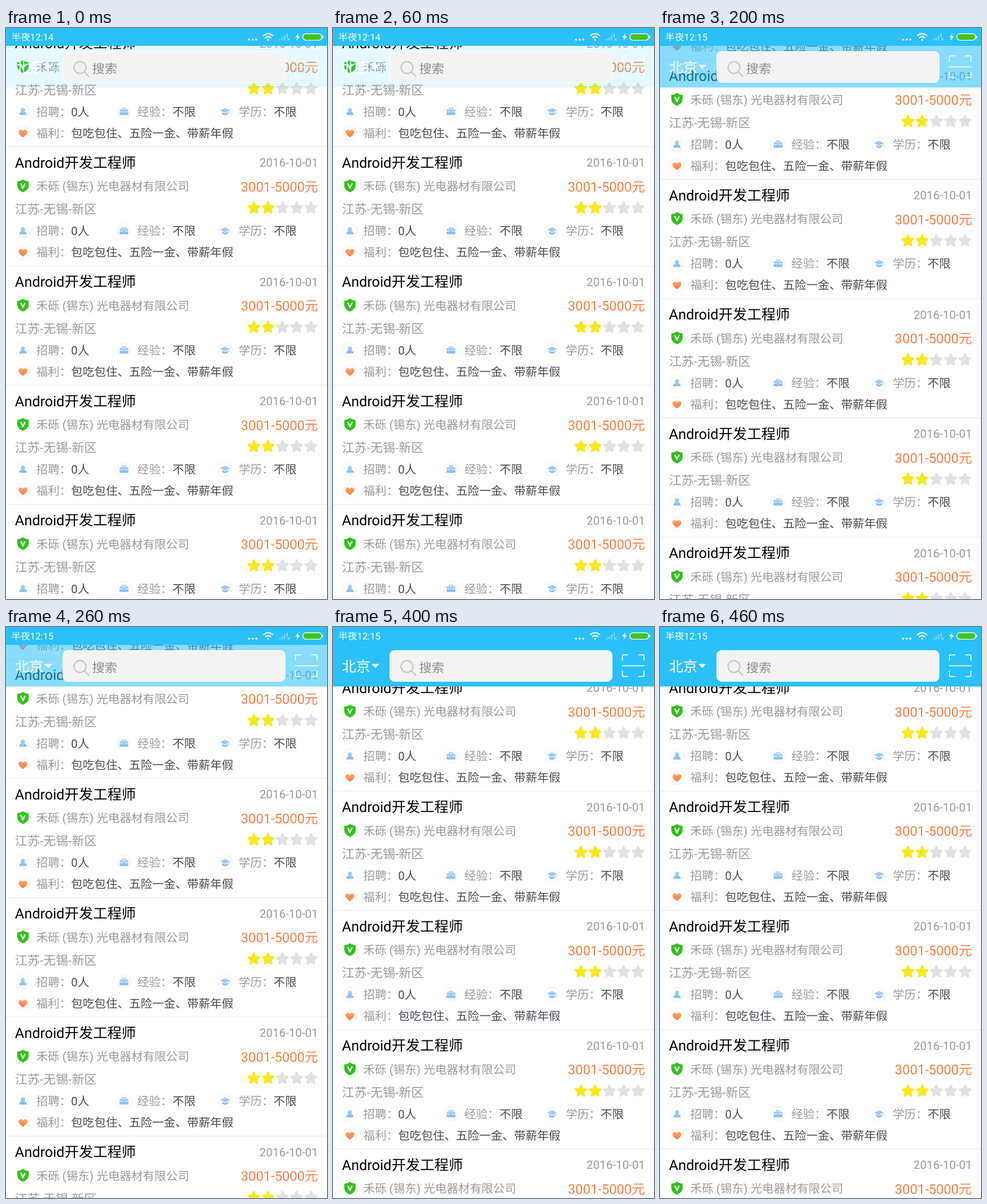
An HTML page that plays this animation: 540 px wide and 960 px high, repeating every 500 ms.

```html
<!DOCTYPE html>
<html lang="zh-CN">
<head>
<meta charset="utf-8">
<title>职位列表</title>
<style>
  @property --scroll { syntax: "<number>"; inherits: true; initial-value: 0; }

  html, body { margin: 0; width: 100%; height: 100%; overflow: hidden; background: #fff; }
  svg.stage {
    display: block; width: 540px; height: 960px;
    font: 19.5px Roboto, "Noto Sans CJK SC", "Noto Sans CJK", sans-serif;
    text-rendering: geometricPrecision;
    animation: scroll .5s step-end infinite;
  }
  .list { transform: translateY(calc(var(--scroll) * -1px)); }
  .bar { opacity: calc(.12 + var(--scroll) * .003); }
  .early { animation: early .5s step-end infinite; }
  .late { animation: late .5s step-end infinite; }

  .title { font-size: 24px; fill: #000; }
  .grey { fill: #999; }
  .dark { fill: #454a52; }
  .place { font-size: 21px; fill: #999; }
  .pay { font-size: 22.5px; fill: #fb7f42; }
  .end { text-anchor: end; }
  .clock { font-size: 15.8px; fill: #fff; }
  .line { fill: none; stroke: #fff; stroke-linecap: round; stroke-linejoin: round; }

  @keyframes scroll {
    0% { --scroll: 0; }
    20% { --scroll: 76; }
    40% { --scroll: 145.5; }
    60% { --scroll: 241; }
    80%, 100% { --scroll: 324.5; }
  }
  @keyframes early { 0% { opacity: 1; } 40%, 100% { opacity: 0; } }
  @keyframes late { 0% { opacity: 0; } 40%, 100% { opacity: 1; } }
</style>
</head>
<body>
<svg class="stage" viewBox="0 0 540 960">
  <defs>
    <linearGradient id="warm" x1="0" y1="0" x2="0" y2="1">
      <stop offset="0" stop-color="#ffa566"/><stop offset="1" stop-color="#f97b45"/>
    </linearGradient>
    <linearGradient id="cool" x1="0" y1="0" x2="0" y2="1">
      <stop offset="0" stop-color="#a9d2fb"/><stop offset="1" stop-color="#84baf5"/>
    </linearGradient>
    <path id="star" d="M0-9.6 2.9-3.6 9.5-2.8 4.7 1.8 5.9 8.3 0 5.1-5.9 8.3-4.7 1.8-9.5-2.8-2.9-3.6Z"
          stroke-width="2.6" stroke-linejoin="round"/>
    <circle id="ring" r="12" fill="#fff" stroke="#f0f1f3"/>

    <g id="row">
      <rect y="0" width="540" height="1" fill="#e9e9e9"/>
      <text class="title" x="15" y="35.5">Android开发工程师</text>
      <text class="grey end" x="525" y="34">2016-10-01</text>

      <path d="M28.5 55.8Q33 59 38 59V67Q37.5 73.5 28.5 77.3Q19.5 73.5 19 67V59Q24 59 28.5 55.8Z" fill="#2fc21b"/>
      <path class="line" d="M25.3 63.3 28.5 70 31.7 63.3" stroke-width="2.5"/>
      <text class="grey" x="51" y="74.3">禾砾 (锡东) 光电器材有限公司</text>
      <text class="pay end" x="525" y="75.5">3001-5000元</text>

      <text class="place" x="15" y="113">江苏-无锡-新区</text>
      <g transform="translate(417 103.5)" fill="#f7e820" stroke="#f7e820">
        <use href="#star"/><use href="#star" x="24"/>
      </g>
      <g transform="translate(465 103.5)" fill="#e1e1e1" stroke="#e1e1e1">
        <use href="#star"/><use href="#star" x="24"/><use href="#star" x="48"/>
      </g>

      <g transform="translate(28.5 142)">
        <use href="#ring"/>
        <path d="M0-6.5A3.7 3.7 0 0 1 2 .3Q6.3 1.5 6.3 5.7H-6.3Q-6.3 1.5-2 .3A3.7 3.7 0 0 1 0-6.5Z" fill="url(#cool)"/>
      </g>
      <text class="grey" x="51" y="149">招聘：</text>
      <text class="dark" x="109.5" y="149">0人</text>

      <g transform="translate(198.5 142)">
        <use href="#ring"/>
        <path d="M-2.8-3.5V-5.5H2.8V-3.5" fill="none" stroke="#9cc9f8" stroke-width="1.4"/>
        <rect x="-7.5" y="-3.8" width="15" height="9.5" rx="1.3" fill="url(#cool)"/>
        <path d="M-7.5.5H-1.5M1.5.5H7.5" stroke="#fff"/>
      </g>
      <text class="grey" x="221" y="149">经验：</text>
      <text class="dark" x="280" y="149">不限</text>

      <g transform="translate(368.5 142)">
        <use href="#ring"/>
        <path d="M0-6 8.5-2 0 2-8.5-2ZM-5 1 0 3.3 5 1V4.3Q0 8-5 4.3ZM7-1H8V4H7Z" fill="url(#cool)"/>
      </g>
      <text class="grey" x="391.5" y="149">学历：</text>
      <text class="dark" x="450" y="149">不限</text>

      <g transform="translate(28.5 178.5)">
        <use href="#ring"/>
        <path d="M0 6.8C-4 4-7.5 1-7.5-2.2C-7.5-6.5-2-7.3 0-3.7C2-7.3 7.5-6.5 7.5-2.2C7.5 1 4 4 0 6.8Z" fill="url(#warm)"/>
      </g>
      <text class="grey" x="51" y="185">福利：</text>
      <text class="dark" x="109.5" y="185">包吃包住、五险一金、带薪年假</text>
    </g>
  </defs>

  <rect width="540" height="960" fill="#fff"/>
  <g class="list" id="list"></g>

  <rect class="bar" y="30" width="540" height="70" fill="#2bc0f8"/>
  <text x="15" y="75" font-size="24" fill="#fff">北京</text>
  <path d="M64.5 62H78L71.25 69Z" fill="#fff"/>
  <rect x="95.5" y="39.5" width="374" height="52" rx="8" fill="#f3f3f3" stroke="#fff"/>
  <g fill="none" stroke="#c6c6c6" stroke-width="2" stroke-linecap="round">
    <circle cx="124.5" cy="66.5" r="10"/><path d="M132 74 139.5 81.5"/>
  </g>
  <text x="145" y="75.5" font-size="21" fill="#8c8c8c">搜索</text>
  <path class="line" stroke-width="1.6" d="M486.8 56V49Q486.800 46.8 489 46.8H496M514 46.8H521Q523.2 46.8 523.2 49V56M523.2 74V81Q523.2 83.2 521 83.2H514M496 83.2H489Q486.8 83.2 486.8 81V74M486.8 65.3H523.2"/>

  <rect width="540" height="30" fill="#2bc0f8"/>
  <text class="clock early" x="9" y="20.5">半夜12:14</text>
  <text class="clock late" x="9" y="20.5">半夜12:15</text>
  <g fill="#fff">
    <circle cx="409" cy="19.5" r="1.8"/><circle cx="415" cy="19.5" r="1.8"/><circle cx="421" cy="19.5" r="1.8"/>
    <circle cx="441" cy="19.5" r="1.9"/>
    <path d="M492 9 486.5 16H490L488.5 21.5 494.5 14H491Z"/>
    <path opacity=".35" d="M459.5 18H462V21H459.5ZM463.5 15.5H466V21H463.5ZM467.5 12.5H470V21H467.5ZM471.5 9.5H474V16H471.5Z"/>
  </g>
  <path class="line" stroke-width="2" d="M433.3 12.7Q441 6.3 448.7 12.7M436.7 16.3Q441 12.5 445.3 16.3"/>
  <path class="line" stroke-width="1" opacity=".8" d="M473.5 17.5 477 21M477 17.5 473.5 21"/>
  <rect x="499.5" y="9.7" width="31.5" height="10.8" rx="5" fill="#45c31f" stroke="#fff" stroke-width="1.2"/>
  <rect x="531.5" y="13" width="2" height="4.5" rx="1" fill="#fff"/>
</svg>
<script>
  const rowHeight = 200.5, firstRow = -1.5;
  const list = document.getElementById("list");
  for (let i = 0; i < 7; i++) {
    const row = document.createElementNS("http://www.w3.org/2000/svg", "use");
    row.setAttribute("href", "#row");
    row.setAttribute("y", firstRow + i * rowHeight);
    list.append(row);
  }
</script>
</body>
</html>
```
